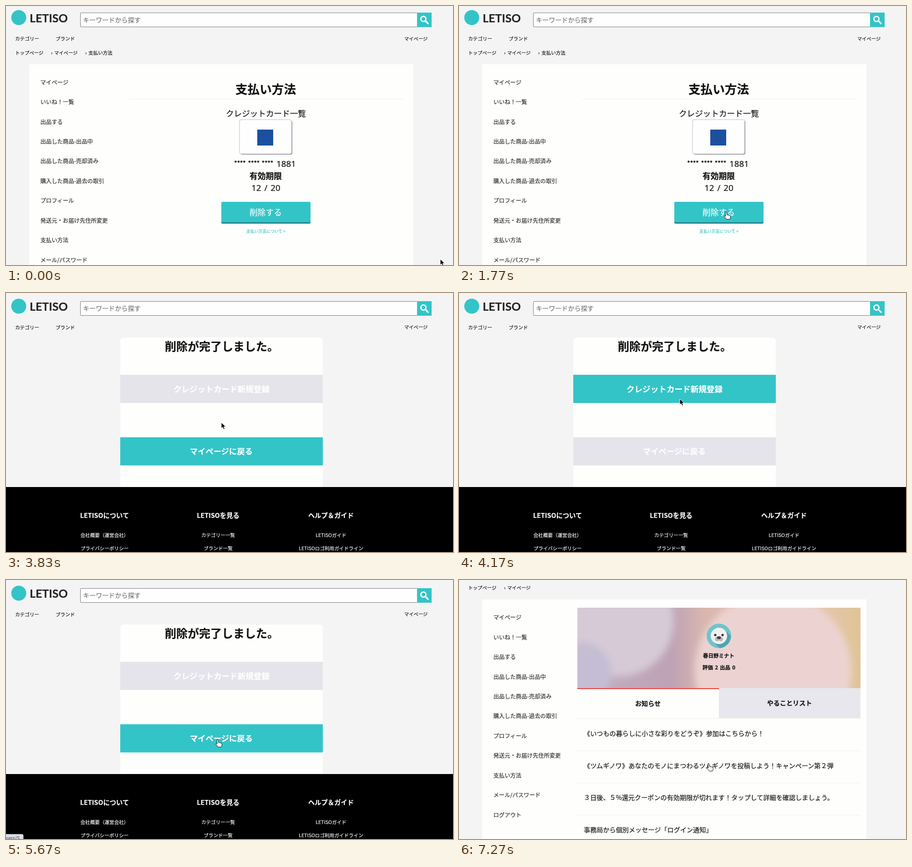
These frames come from a looping animation (982x570 px, 7.31 s). An HTML page:

```html
<!DOCTYPE html>
<html lang="ja">
<head>
<meta charset="utf-8">
<title>支払い方法</title>
<style>
  html, body { margin: 0; width: 100%; height: 100%; overflow: hidden; background: #f4f4f4; }
  svg { display: block; width: 100%; height: 100%; }
  text {
    font-family: "Noto Sans CJK JP", "Noto Sans CJK", "Noto Sans", sans-serif;
    text-spacing-trim: space-all; white-space: pre; stroke-width: .2px;
  }
  .logo { font-family: Lato, sans-serif; }
  .number { font-family: "Noto Sans", sans-serif; }
</style>
</head>
<body>
<svg id="stage" viewBox="0 0 982 570"></svg>
<script>
const LOOP = 7310, TEAL = '#33c4c8', GRAY = '#e5e4ea', PAPER = '#fefefd';

// y is the vertical centre of the line of text
const text = (x, y, size, str, { fill = '#111', bold, mid, cls = '', gap = 0 } = {}) =>
  `<text x="${x}" y="${y + size * 0.38}" font-size="${size}" fill="${fill}" stroke="${fill}" class="${cls}"
    font-weight="${bold ? 700 : 400}" text-anchor="${mid ? 'middle' : 'start'}" word-spacing="${gap}">${str}</text>`;
const rect = (x, y, w, h, fill, extra = '') =>
  `<rect x="${x}" y="${y}" width="${w}" height="${h}" fill="${fill}" ${extra}/>`;
const circle = (x, y, r, fill) => `<circle cx="${x}" cy="${y}" r="${r}" fill="${fill}"/>`;
const centre = { mid: true }, strong = { mid: true, bold: true };
const white = { mid: true, fill: '#fff' }, whiteBold = { mid: true, bold: true, fill: '#fff' };

const header = circle(28, 29, 16.5, TEAL)
  + text(52, 29.5, 25, 'LETISO', { cls: 'logo', fill: '#222', bold: true })
  + rect(163.5, 18.5, 740, 31, '#fefefe', 'stroke="#777" rx="1"')
  + text(169, 34, 14.1, 'キーワードから探す', { fill: '#757575' })
  + rect(903, 18, 32, 32, TEAL)
  + '<path d="M921 36l6 6" stroke="#fff" stroke-width="3.4" stroke-linecap="round"/>'
  + '<circle cx="917" cy="32" r="5.6" fill="none" stroke="#fff" stroke-width="2.8"/>'
  + text(20, 75.5, 10.6, 'カテゴリー') + text(109, 75.5, 10.6, 'ブランド')
  + text(875, 75.5, 10.3, 'マイページ');

const menu = ['マイページ', 'いいね！一覧', '出品する', '出品した商品-出品中', '出品した商品-売却済み',
  '購入した商品-過去の取引', 'プロフィール', '発送元・お届け先住所変更', '支払い方法',
  'メール/パスワード', 'ログアウト'];
const account = text(20, 106.5, 10.4, 'トップページ')
  + text(99, 106.5, 10.4, '›') + text(106, 106.5, 10.3, 'マイページ')
  + rect(51, 131.5, 844, 700, PAPER)
  + menu.map((m, i) => text(75.5, 171.5 + i * 43.45, 12.35, m, { fill: '#2a2a2a' })).join('');

const payment = text(174, 103, 10.4, '›') + text(181, 103, 10.6, '支払い方法')
  + text(570.5, 183, 26.6, '支払い方法', strong)
  + rect(270, 204.5, 602, 1, '#efeedd')
  + text(571, 236, 17.6, 'クレジットカード一覧', centre)
  + rect(515, 252, 114, 75, '#8d8d98', 'rx="4"')
  + rect(513, 250, 114.5, 75.5, '#fefefe', 'rx="4" stroke="#bbb"')
  + rect(552, 272, 35, 35, '#1c4f9f')
  + [514, 544.5, 574.5].map(x => text(x, 345.5, 12.5, '****', strong)).join('')
  + text(594, 347, 18.8, '1881', { cls: 'number' })
  + text(570.5, 374, 17.7, '有効期限', strong)
  + text(571, 400, 18.8, '12 / 20', { mid: true, cls: 'number', gap: 2 })
  + rect(473, 431, 196, 48, '#27828c', 'rx="3"') + rect(473, 431, 196, 45, TEAL, 'rx="3"')
  + text(570.5, 454, 17.7, '削除する', white)
  + text(571, 496, 8.8, '支払い方法について &gt;', { mid: true, fill: TEAL });

const column = (x, title, ...links) => text(x, 490, 14.3, title, whiteBold)
  + links.map((l, i) => text(x, 533 + i * 28.5, 10.6, l, white)).join('');
const done = rect(251, 98, 445, 340, PAPER, 'rx="8"')
  + text(349, 117.5, 25, '削除が完了しました。', { bold: true })
  + rect(251, 180, 445, 62, GRAY, 'id="addCard"') + text(473.5, 211.5, 17.6, 'クレジットカード新規登録', whiteBold)
  + rect(251, 317.5, 445, 62, GRAY, 'id="goBack"') + text(473, 348.5, 17.3, 'マイページに戻る', whiteBold)
  + rect(0, 427, 982, 143, '#000')
  + column(216.5, 'LETISOについて', '会社概要（運営会社）', 'プライバシーポリシー')
  + column(466, 'LETISOを見る', 'カテゴリー一覧', 'ブランド一覧')
  + column(714, 'ヘルプ＆ガイド', 'LETISOガイド', 'LETISOロゴ利用ガイドライン');

const banner = `<g clip-path="url(#bannerClip)">${rect(260, 61, 622, 177, 'url(#sky)')}<g filter="url(#soft)">`
  + circle(350, 90, 122, '#d5cad6') + circle(268, 205, 68, '#c5bdd3')
  + circle(690, 200, 172, '#ecd3d1') + '</g></g>';
const avatar = circle(571, 123, 27, '#6fc4cd')
  + '<path d="M584 110l13 13a27 27 0 0 1-24 27l-14-13z" fill="#4fa5b3"/>'
  + circle(571, 123, 18, '#f1f1ee') + circle(563, 121, 2.6, '#333') + circle(579, 121, 2.6, '#333')
  + circle(567, 130, 5, '#bbb') + circle(575, 130, 5, '#bbb')
  + '<ellipse cx="571" cy="127" rx="4.5" ry="3.2" fill="#444"/>';
const news = ['《いつもの暮らしに小さな彩りをどうぞ》参加はこちらから！',
  '《ツムギノワ》あなたのモノにまつわるツムギノワを投稿しよう！キャンペーン第２弾',
  '３日後、５%還元クーポンの有効期限が切れます！タップして詳細を確認しましょう。',
  '事務局から個別メッセージ「ログイン通知」'];
const mypage = banner + avatar
  + text(570.5, 166.5, 11.5, '春日野ミナト', strong)
  + text(571, 193, 11.5, '評価 2 出品 0', { ...strong, gap: 1.5 })
  + rect(260, 238, 311, 2, '#f33a34') + rect(571, 238, 311, 66, '#e7e7ed')
  + text(415, 272, 14.1, 'お知らせ', strong) + text(726, 271, 14.1, 'やることリスト', strong)
  + news.map((n, i) => rect(260, 304.5 + i * 70.8, 622, 1, '#f1f0e4')
      + text(274, 337.5 + i * 70.8, 14.15, n)).join('');

const stage = document.getElementById('stage');
stage.innerHTML = `<defs>
  <linearGradient id="sky">
    <stop offset="0" stop-color="#c3b0c4"/><stop offset=".33" stop-color="#bea2b5"/>
    <stop offset=".45" stop-color="#d9b6b0"/><stop offset=".8" stop-color="#e6c8b4"/>
    <stop offset="1" stop-color="#dfc498"/>
  </linearGradient>
  <filter id="soft"><feGaussianBlur stdDeviation="8"/></filter>
  <clipPath id="bannerClip">${rect(260, 61, 622, 177, '#fff')}</clipPath></defs>
  ${rect(0, 0, 982, 570, '#f4f4f4')}
  <g id="page">${header}
    <g id="account">${account}</g>
    <g id="payment" transform="translate(0 3.5)">${payment}</g>
    <g id="done">${done}</g>
    <g id="mypage" transform="translate(0 89)">${mypage}</g>
  </g>
  <g id="status"><rect id="bar" x="-5" y="559.5" height="20" rx="3" fill="#dadde3" stroke="#a9adb5"/>
    <text id="hint" y="572" font-size="10.6" fill="#444"></text></g>
  <g id="cursor" stroke-linejoin="round">
    <path id="arrow" d="M0 0v13l3-2.8 2.2 4.8 2.4-1-2.2-4.7h4.2z" fill="#000" stroke="#fff"/>
    <path id="hand" d="M-2 1q0-1.6 1.4-1.6T1 1l.9 5q1.5-1 2.6.4 1.5-.9 2.5.5 1.9-.4 2 1.3
      l.3 3.8-1.3 3.5H1L-3.8 9.8q-1.2-2 .4-2.3l2.3 1.3z" fill="#fff" stroke="#111"/>
  </g>`;

const el = id => document.getElementById(id);
const show = (id, on) => { el(id).style.display = on ? '' : 'none'; };
const smooth = p => p * p * (3 - 2 * p);
const within = (t, a, b) => t >= a && t < b;

// [time, x, y] of the pointer tip
const path = [[0, 954, 557], [200, 954, 557], [1250, 587, 454], [3300, 587, 454], [3830, 473, 285],
  [4170, 485, 233], [4450, 488, 214], [4850, 488, 214], [5200, 465, 352], [6050, 465, 352],
  [6500, 549, 405], [LOOP, 549, 405]];
const hands = [[1180, 3200], [4210, 4980], [5110, LOOP]];
// [from, to, bar width, text x, text]
const hints = [[2150, 3100, 290, -6, 'を待機しています...'], [4560, 4990, 50, 0, 'ards/new'],
  [5240, 6150, 38, 0, 'sers/5']];
const TO_DONE = 2500, TO_MYPAGE = 5880;

function pointer(t) {
  const i = path.findIndex((k, n) => n && t <= k[0]);
  const [t0, x0, y0] = path[i - 1], [t1, x1, y1] = path[i];
  const p = smooth((t - t0) / (t1 - t0));
  return [x0 + (x1 - x0) * p, y0 + (y1 - y0) * p];
}

function draw(t) {
  const paying = t < TO_DONE, finished = within(t, TO_DONE, TO_MYPAGE), mine = t >= TO_MYPAGE;
  show('account', !finished);
  show('payment', paying);
  show('done', finished);
  show('mypage', mine);

  const scroll = paying ? 3.5 : 89 * smooth(Math.min(1, Math.max(0, (t - 6650) / 500)));
  el('page').setAttribute('transform', `translate(0 ${-scroll})`);
  el('addCard').setAttribute('fill', within(t, 4110, 4980) ? TEAL : GRAY);
  el('goBack').setAttribute('fill', within(t, 3600, 3890) || t >= 5080 ? TEAL : GRAY);

  const hint = hints.find(h => within(t, h[0], h[1]));
  show('status', hint);
  if (hint) {
    el('bar').setAttribute('width', hint[2] + 5);
    el('hint').setAttribute('x', hint[3]);
    el('hint').textContent = hint[4];
  }

  const hand = hands.some(([a, b]) => within(t, a, b));
  show('hand', hand);
  show('arrow', !hand);
  el('cursor').setAttribute('transform', `translate(${pointer(t).join(' ')})`);
}

const start = performance.now();
function tick() {
  draw((performance.now() - start) % LOOP);
  requestAnimationFrame(tick);
}
tick();
</script>
</body>
</html>
```
